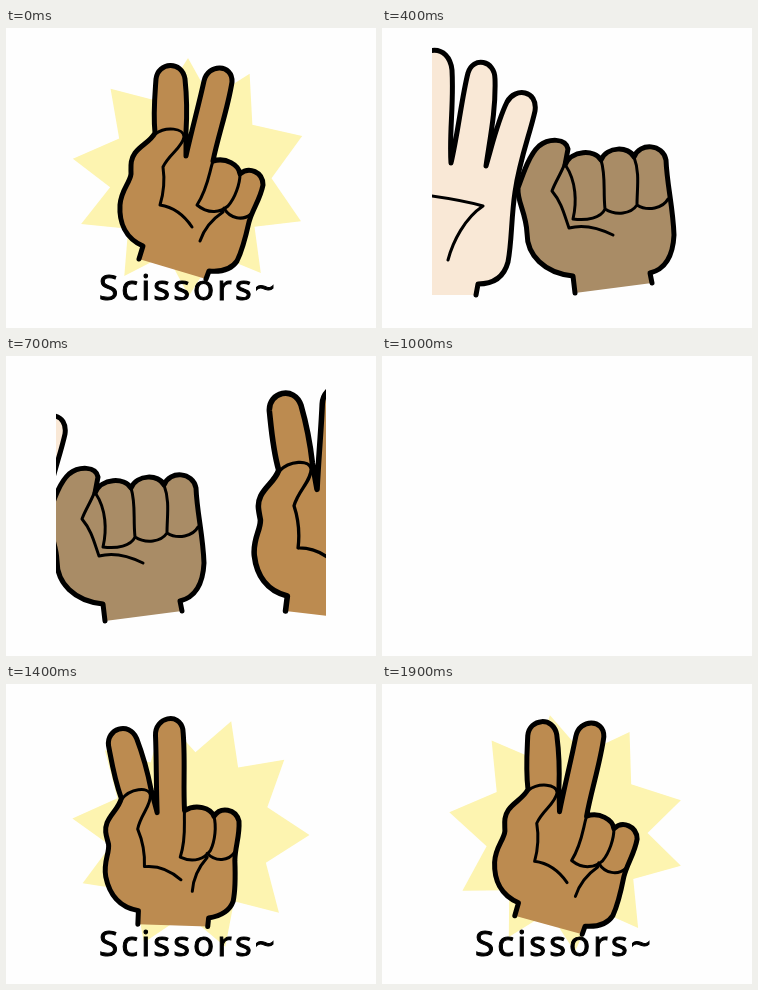
Animation, 370 px wide and 300 px high, one loop 2 s. Source, as an HTML page with a canvas:

```html
<!DOCTYPE html>
<html lang="en">
<head>
<meta charset="utf-8">
<title>Rock paper scissors</title>
<style>
  html, body { margin: 0; width: 100%; height: 100%; overflow: hidden; background: #fefefe; }
  canvas { display: block; }
</style>
</head>
<body>
<canvas id="stage" width="370" height="300"></canvas>
<script>
const ctx = document.getElementById('stage').getContext('2d');
const FRAME_MS = 100, FRAMES = 20, REEL_END = 10;
const REEL_STEP = 157, SET_WIDTH = 565;

const hand = (skin, outline, creases) =>
  ({ skin, outline: new Path2D(outline), creases: new Path2D(creases) });

const scissors = hand('#bc8b50',
  `M133 231 L137 218 C119 210 113 194 114 177 C115 162 124 155 125 146
   C125 138 124 132 129 125 C135 117 144 114 149 105 C147 85 149 66 150 51
   C152 34 176 32 179 51 C181 70 181 88 180 104 L180 128
   C186 101 193 76 198 53 C202 35 227 36 226 54
   C222 80 212 108 207 133 C220 129 233 137 234 146 C243 138 257 144 257 157
   C254 172 247 180 243 194 C239 212 235 225 231 233 C225 242 214 244 203 243 L200 251`,
  `M149 106 C160 98 178 100 178 109 C176 120 163 126 157 139
   C159 153 158 164 154 177 C167 179 178 187 186 199
   M207 133 C203 145 202 160 191 177 C203 187 215 184 222 178 C229 170 234 156 234 146
   M218 180 C224 191 237 193 245 186 M217 184 C205 192 198 201 194 213`);

const rock = hand('#a98c66',
  `M193 265 L191 248 C162 245 145 227 145 205 C144 184 135 174 136 160
   C142 143 148 126 157 118 C167 110 184 110 186 121 L183 137
   C189 122 213 121 219 132 C225 118 247 118 252 129 C258 114 281 116 284 132
   C285 157 291 179 292 207 C291 228 284 241 268 245 L270 255`,
  `M186 121 C184 140 175 149 170 163 C180 175 182 186 187 200
   C202 196 217 200 231 207 M184 138 C194 153 195 174 191 191
   C205 193 219 190 223 181 C221 163 224 148 219 132
   M223 181 C234 188 249 186 255 177 C255 160 258 145 252 129
   M255 177 C266 184 281 180 286 171`);

const paper = hand('#f9e8d6',
  `M18 267 L18 256 C3 251 -5 234 -10 214 C-17 193 -39 176 -44 155
   C-45 141 -30 137 -22 148 L-7 168 C-8 125 -14 84 -12 48 C-9 29 16 29 19 48
   L32 132 C31 100 29 65 34 40 C38 17 67 15 70 42 C72 76 67 105 69 135
   C76 105 80 68 86 45 C91 28 113 32 113 51 C114 82 108 110 104 138
   C111 114 116 92 125 74 C133 59 156 62 153 83 C148 106 138 130 133 164
   C129 191 130 213 126 234 C122 249 112 256 96 256 L94 267`,
  'M15 164 C46 167 75 171 101 178 C83 190 71 213 66 232');

function drawHand({ skin, outline, creases }) {
  ctx.fillStyle = skin;
  ctx.fill(outline);
  ctx.strokeStyle = '#000';
  ctx.lineJoin = ctx.lineCap = 'round';
  ctx.lineWidth = 5;
  ctx.stroke(outline);
  ctx.lineWidth = 3;
  ctx.stroke(creases);
}

function withTransform(draw, x, y, angle = 0, scale = 1, pivotX = 0, pivotY = 0) {
  ctx.save();
  ctx.translate(x, y);
  ctx.rotate(angle * Math.PI / 180);
  ctx.scale(scale, scale);
  ctx.translate(-pivotX, -pivotY);
  draw();
  ctx.restore();
}

function drawSet(x, paperY) {
  withTransform(() => drawHand(paper), x, paperY);
  withTransform(() => drawHand(rock), x, 0);
  withTransform(() => drawHand(scissors), x + 370, 37, -10, 1.11, 164, 37);
}

function drawReel(frame) {
  const x = (frame - 4) * REEL_STEP;
  ctx.save();
  ctx.beginPath();
  ctx.rect(50, 0, 270, 300);
  ctx.clip();
  drawSet(x, 0);
  drawSet(x - SET_WIDTH, -5);
  ctx.restore();
}

function drawBurst(turn) {
  const tips = [-58, -16, 16, 53, 86, 119, 151, 190, 231, 262];
  const point = (angle, radius) => {
    const a = (angle + turn) * Math.PI / 180;
    ctx.lineTo(184.5 + radius * Math.cos(a), 149 + radius * Math.sin(a));
  };
  ctx.beginPath();
  tips.forEach((tip, i) => {
    const next = i < 9 ? tips[i + 1] : tips[0] + 360;
    point(tip, 119);
    point((tip + next) / 2, 81);
  });
  ctx.fillStyle = '#fdf4b0';
  ctx.fill();
}

const easeInOutQuad = p => p < 0.5 ? 2 * p * p : 1 - 2 * (1 - p) ** 2;

function drawResult(frame) {
  const step = frame || FRAMES;
  const swing = -16 * easeInOutQuad(1 - Math.abs(step - 15) / 5);
  drawBurst((step - 19) * 37.8);
  withTransform(() => drawHand(scissors), 168, 240, swing, 1, 168, 240);
  ctx.font = '500 35px "Noto Sans", sans-serif';
  ctx.letterSpacing = '3.1px';
  ctx.fillStyle = ctx.strokeStyle = '#000';
  ctx.lineWidth = 1;
  ctx.fillText('Scissors~', 93, 272);
  ctx.strokeText('Scissors~', 93, 272);
}

function render(now) {
  const frame = Math.floor(now / FRAME_MS) % FRAMES;
  ctx.fillStyle = '#fefefe';
  ctx.fillRect(0, 0, 370, 300);
  if (frame > 0 && frame <= REEL_END) drawReel(frame);
  else drawResult(frame);
}

let start;
function tick(now) {
  start ??= now;
  render(now - start);
  requestAnimationFrame(tick);
}
render(0);
requestAnimationFrame(tick);
</script>
</body>
</html>
```
